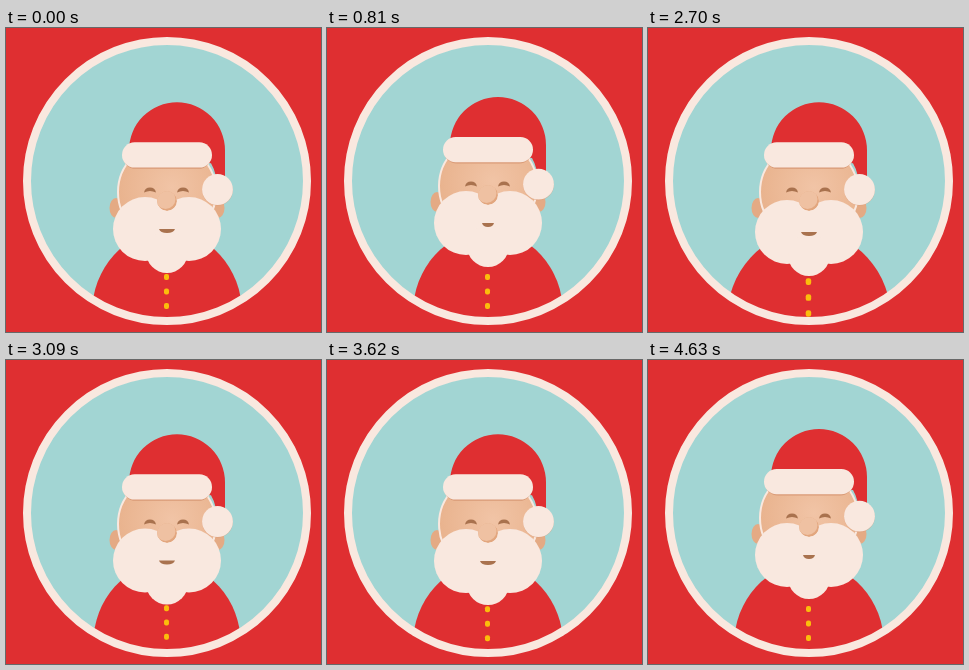
Write an HTML page that moves like this. It is 315x304 px and loops after 6030 ms.

```html
<!DOCTYPE html>
<html lang="en">
<head>
<meta charset="utf-8">
<title>Laughing Santa</title>
<style>
  html, body { margin: 0; width: 100%; height: 100%; overflow: hidden; background: #df2f31; }
  svg { display: block; width: 100%; height: 100%; }
  .red { fill: #df2f31; }
  .cream { fill: #f9e8df; }
  .ear { fill: #e4aa84; }
  .brown { fill: #a9724e; }
  .gold { fill: #fbbd0c; }
</style>
</head>
<body>
<svg viewBox="0 0 315 304">
  <defs>
    <clipPath id="disc"><circle cx="161" cy="153" r="137"/></clipPath>
    <clipPath id="noseClip"><circle cx="161" cy="167" r="10"/></clipPath>
    <radialGradient id="skin" cx=".55" cy=".45" r=".55">
      <stop offset="0" stop-color="#f1c4a6"/>
      <stop offset="1" stop-color="#e9b38e"/>
    </radialGradient>
  </defs>
  <rect class="red" width="315" height="304"/>
  <circle cx="161" cy="153" r="137" fill="#a2d5d3"/>

  <g clip-path="url(#disc)">
    <g id="body">
      <ellipse class="red" cx="161" cy="285" rx="75" ry="82"/>
      <rect class="red" x="86" y="285" width="150" height="40"/>
      <rect class="gold" x="158" y="246" width="5" height="6" rx="2"/>
      <rect class="gold" x="158" y="260.5" width="5" height="6" rx="2"/>
      <rect class="gold" x="158" y="275" width="5" height="6" rx="2"/>
    </g>
  </g>

  <g id="face">
    <ellipse class="ear" cx="110" cy="174" rx="6.5" ry="10"/>
    <ellipse class="ear" cx="212" cy="174" rx="6.5" ry="10"/>
    <ellipse cx="161" cy="158" rx="49" ry="49" fill="url(#skin)" stroke="#f9e8df" stroke-width="2"/>
    <path class="brown" d="M138 158.5Q139 153.5 144 153.5T150 158.5Q144 155.5 138 158.5Z"/>
    <path class="brown" d="M171 158.5Q172 153.5 177 153.5T183 158.5Q177 155.5 171 158.5Z"/>
  </g>

  <g id="beard">
    <circle class="cream" cx="139" cy="195" r="32"/>
    <circle class="cream" cx="183" cy="195" r="32"/>
    <circle class="cream" cx="161" cy="218" r="21"/>
    <path id="mouth" class="brown" d="M-6 -2H6Q5 2 0 2T-6 -2Z"/>
  </g>

  <g id="nose" clip-path="url(#noseClip)">
    <circle cx="161" cy="167" r="10" fill="#e2a67e"/>
    <circle cx="159.5" cy="165" r="10" fill="#efc1a2"/>
  </g>

  <g id="hat">
    <path class="red" d="M123 122V117A48 48 0 0 1 219 117V156H211Q211 140 205 130Z"/>
    <rect x="117" y="110.5" width="88" height="25" rx="12.5" fill="#d99a76"/>
    <rect class="cream" x="116" y="109" width="90" height="25.3" rx="12.6"/>
    <circle cx="211.5" cy="157" r="15.3" fill="#d99a76" opacity=".6"/>
    <circle class="cream" cx="211.5" cy="156.2" r="15.4"/>
  </g>

  <circle cx="161" cy="153" r="140" fill="none" stroke="#f9e8df" stroke-width="8"/>
</svg>
<script>
const LOOP = 6030;
const $ = id => document.getElementById(id);
const body = $('body'), face = $('face'), beard = $('beard');
const mouth = $('mouth'), nose = $('nose'), hat = $('hat');

// [time, value] pairs joined by sine easing
const drop = [[0, 1], [610, 1], [800, 0], [2430, 0], [2640, 1], [4400, 1], [4620, 0]];
const belly = [[2440, 1], [2710, 1.1], [3020, .982], [3645, 1.003], [3870, 1]];

function at(keys, t) {
  if (t <= keys[0][0]) return keys[0][1];
  for (let i = 1; i < keys.length; i++) {
    const [t0, a] = keys[i - 1], [t1, b] = keys[i];
    if (t < t1) return a + (b - a) * (1 - Math.cos(Math.PI * (t - t0) / (t1 - t0))) / 2;
  }
  return keys[keys.length - 1][1];
}

const move = (el, y) => el.setAttribute('transform', `translate(0 ${y.toFixed(2)})`);

function draw(t) {
  const down = at(drop, t), swell = at(belly, t);
  const wobble = 30 * (swell - 1);
  body.setAttribute('transform', `translate(161 203) scale(${swell}) translate(-161 -203)`);
  move(face, 6 * down);
  move(nose, 6 * down);
  move(beard, 6 * down + wobble);
  move(hat, 5.3 * at(drop, t - 15));
  mouth.setAttribute('transform', `translate(161 197) scale(${1 + down / 3} 1)`);
}

function tick() {
  draw(performance.now() % LOOP);
  requestAnimationFrame(tick);
}
tick();
</script>
</body>
</html>
```
